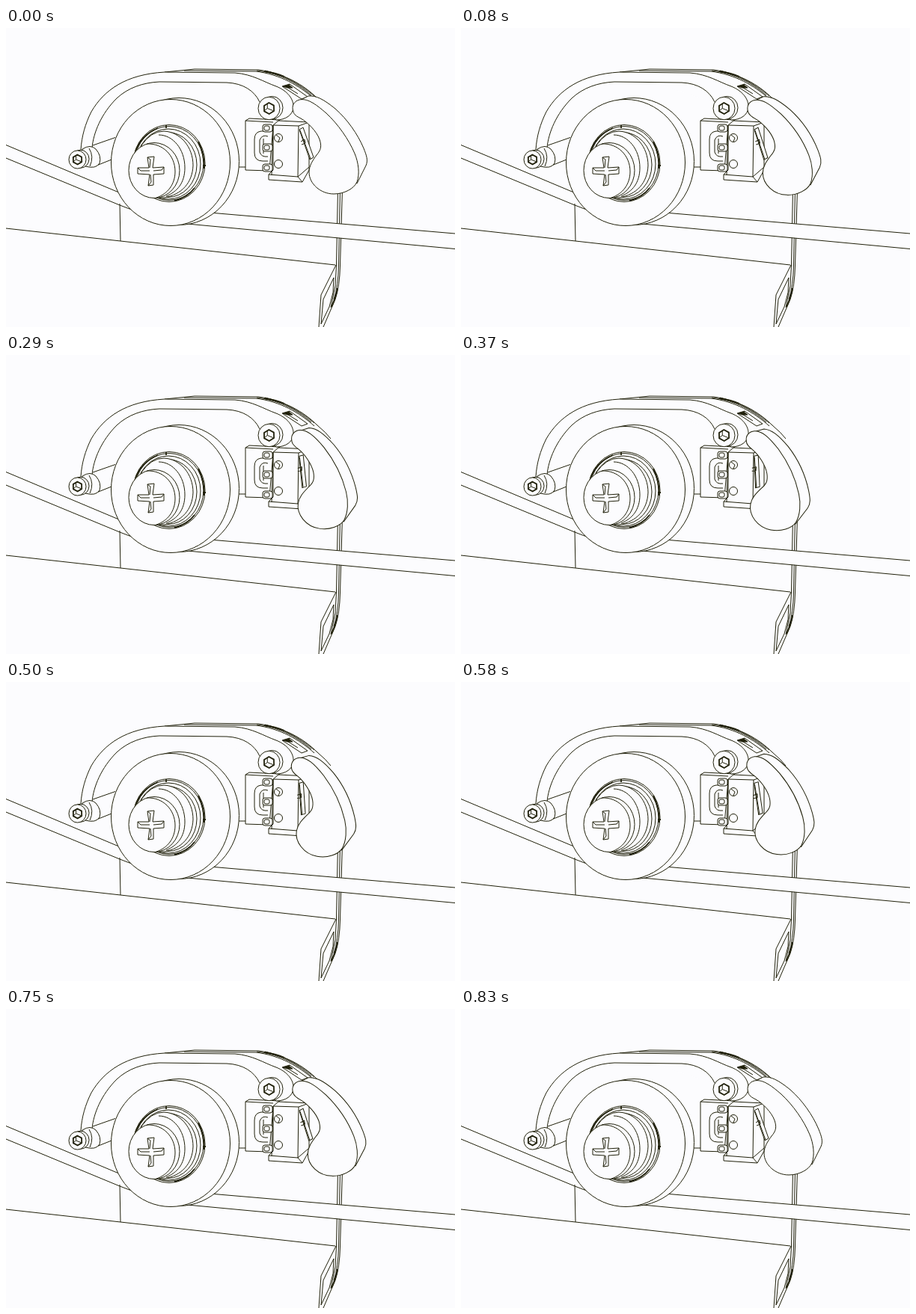
Recreate the animation shown at these times as an HTML page. Size 600 px wide and 400 px high, loop 0.87 s.

```html
<!DOCTYPE html>
<html lang="en">
<head>
<meta charset="utf-8">
<title>Lever mechanism</title>
<style>
  html, body { margin: 0; width: 100%; height: 100%; overflow: hidden; background: #fcfcfe; }
  svg { display: block; width: 600px; height: 400px; }
  .ink { fill: none; stroke: #20200a; stroke-width: 1; stroke-linejoin: round; }
  .solid { fill: #fcfcfe; }
  .bare { fill: #fcfcfe; stroke: none; }
  .bold { stroke-width: 1.8; }
  .dark { fill: #20200a; }
</style>
</head>
<body>
<svg viewBox="0 0 600 400">
  <g class="ink">
    <!-- base plate -->
    <path d="M152 234L153 285M0 268L153 285L440 317M310 186H321"/>
    <path d="M443.500 215L441.500 317M446.500 215L444.500 318M449.500 215L446.500 318Q446 345 440 363L424 400M444.500 318Q444 345 438 363"/>
    <path d="M441 317L421 357L418 400M441.500 317L440 345L434 374M438 334L424 363L421 396M438 334L437 354L432 373L421 396"/>
    <path class="bold" d="M443 348Q441 360 435 373"/>

    <!-- belt -->
    <path class="bare" d="M0 156L152 221L172 243L0 174ZM272 247L600 275V295L242 262Z"/>
    <path d="M0 156.500L152 220.500M0 174L152 237L173 245M272 247L600 275M242 262L600 295.500"/>

    <!-- cover layers -->
    <path class="bare" d="M212 59L252 55L340 56C370 60 395 74 413 90L400 124L340 100Z"/>
    <path d="M212 59L252 55L338 56C372 61 398 76 416 94Q428 104 434 112"/>
    <path d="M238 57L334 58C366 62 392 77 412 95M346 57C376 64 396 78 412 91M335 57C362 60 386 71 408 90"/>
    <path class="bold" d="M345 58Q360 60 372 65"/>

    <!-- switch -->
    <path class="solid" d="M320 124L325 121L366 123L357 131L352 191L320 190Z"/>
    <path d="M320 124L357 126M350 138H341Q332 139 332 149V167Q332 178 343 178H350M350 145Q342 142 339 150V166Q341 173 350 172M344 148V168"/>
    <path class="solid" d="M357 130L364 124L405 126V190L396 206L351 203V196L357 190Z"/>
    <path d="M357 130L391 131L405 126M391 131L390 199L396 206M351 196L390 199L405 186M357 130L355 197"/>
    <g id="pins"></g>
    <circle cx="364" cy="147" r="5.500"/>
    <circle cx="364" cy="182" r="5.500"/>
    <path d="M361 143L366 147L364 152"/>
    <g id="blade">
      <path class="solid" d="M392 136L397 133L411 173L406 176Z"/>
      <path d="M393 137L407 175M394 152L399 149L400 154L395 156"/>
    </g>

    <!-- front link -->
    <path class="solid" d="M100 163C101 145 106 128 114 112C131 83 160 62 212 59L306 60C330 62 344 72 361 78C376 84 385 95 384 107C383 116 374 123 361 123L339 99C332 84 317 74 295 73L205 72C183 73 163 80 148 94C127 115 117 140 115 160L107 170Z"/>
    <path class="bare" d="M117 157L146 146V175L120 185Z"/>
    <path d="M116 157L146 146.500M121 184L146 174"/>
    <path class="solid" d="M102 162Q113 155 120 162Q128 171 125 181Q120 189 106 185Z"/>
    <path d="M111 161Q118 172 112 185"/>
    <path d="M369 78L379 75L403 92L395 95ZM374 78L390 88M379 75L377 80"/>
    <path class="dark" d="M370 78L378 76L383 80L376 80Z"/>

    <!-- lever -->
    <g id="lever">
      <path class="solid" d="M394 96L404 91C414 90 424 95 440 108C456 122 470 142 478 161C482 171 484 177 481 184L469 208L440 180Z"/>
      <path class="solid" d="M384 112C381 104 385 98 392 96C402 94 412 100 428 114C444 129 458 149 466 168C471 180 473 195 469 206C465 215 452 222 438 222C420 222 405 208 405 193C405 184 410 177 415 170C421 163 422 158 419 149C415 138 403 126 394 121C388 118 385 116 384 112Z"/>
    </g>

    <g id="bolts"></g>

    <!-- wheel -->
    <ellipse class="solid" cx="231" cy="178.500" rx="80.500" ry="85"/>
    <ellipse class="solid" cx="220" cy="180" rx="79.500" ry="84.500"/>

    <!-- bearing and hub -->
    <ellipse class="solid" cx="218" cy="181" rx="48" ry="51.500"/>
    <ellipse cx="218" cy="181" rx="46" ry="49.500"/>
    <ellipse cx="217" cy="182" rx="43" ry="47"/>
    <ellipse cx="216" cy="183" rx="39" ry="43.500"/>
    <path class="bold" d="M173 165Q181 143 203 134M214 130V134M263 184H267M257 152Q265 168 265 188M225 231Q242 227 252 214"/>
    <path class="solid" d="M181 157Q194 138 211 138C233 139 250 159 250 184C249 207 235 223 211 227L196 227Z"/>
    <path d="M204 143C223 143 239 162 239 187C239 207 229 219 214 225"/>
    <ellipse class="solid" cx="198" cy="190.500" rx="34" ry="37"/>
    <path d="M188 155C210 154 226 171 226 192C226 209 216 222 201 227"/>
    <path d="M189 173L198 172L196 187L211 186V195L197 196V210L190 211L192 196L176 195V187L191 187Z"/>
    <path d="M189 173L193 176L192 187M211 186L208 190L197 191M190 211L194 206L193 196M176 187L180 191L192 191"/>
  </g>
</svg>
<script>
const $ = id => document.getElementById(id);

const bolt = (x, y, r, depth, hex) => {
  const points = [...Array(6)].map((_, i) => {
    const a = i * Math.PI / 3 + 0.5;
    return `${x + hex * Math.cos(a)},${y + hex * Math.sin(a)}`;
  }).join(' ');
  const head = (cx, cy) => `<ellipse class="solid" cx="${cx}" cy="${cy}" rx="${r}" ry="${r * 1.05}"/>`;
  return head(x + depth, y - depth * 0.2) + head(x, y) +
    `<polygon class="bold" points="${points}"/>
     <path d="M${x - hex * 0.3} ${y - hex * 0.8}V${y}L${x + hex * 0.7} ${y + hex * 0.4}M${x - hex * 0.3} ${y}L${x - hex * 0.8} ${y + hex * 0.4}"/>`;
};
$('bolts').innerHTML = bolt(95.5, 176, 11.5, 4, 6.5) + bolt(351.5, 107.5, 14.5, 4, 7.5);

$('pins').innerHTML = [134, 160, 187].map(y =>
  `<rect class="solid" x="343" y="${y - 5}" width="13" height="10" rx="3"/>
   <rect x="345" y="${y - 3}" width="7" height="6" rx="2"/>`).join('');

const LOOP = 870, STEP = 1000 / 24, STEPS = 20;

function draw(now) {
  const tick = Math.floor((now % LOOP) / 10) * 10;
  const step = Math.floor((tick + 5.01) / STEP);
  const swing = (1 - Math.cos(2 * Math.PI * step / STEPS)) / 2;
  $('lever').setAttribute('transform', `rotate(${11 * swing} 362 100)`);
  $('blade').setAttribute('transform', `rotate(${17 * swing} 394 134)`);
}

const start = performance.now();
function loop() {
  draw(performance.now() - start);
  requestAnimationFrame(loop);
}
loop();
</script>
</body>
</html>
```
